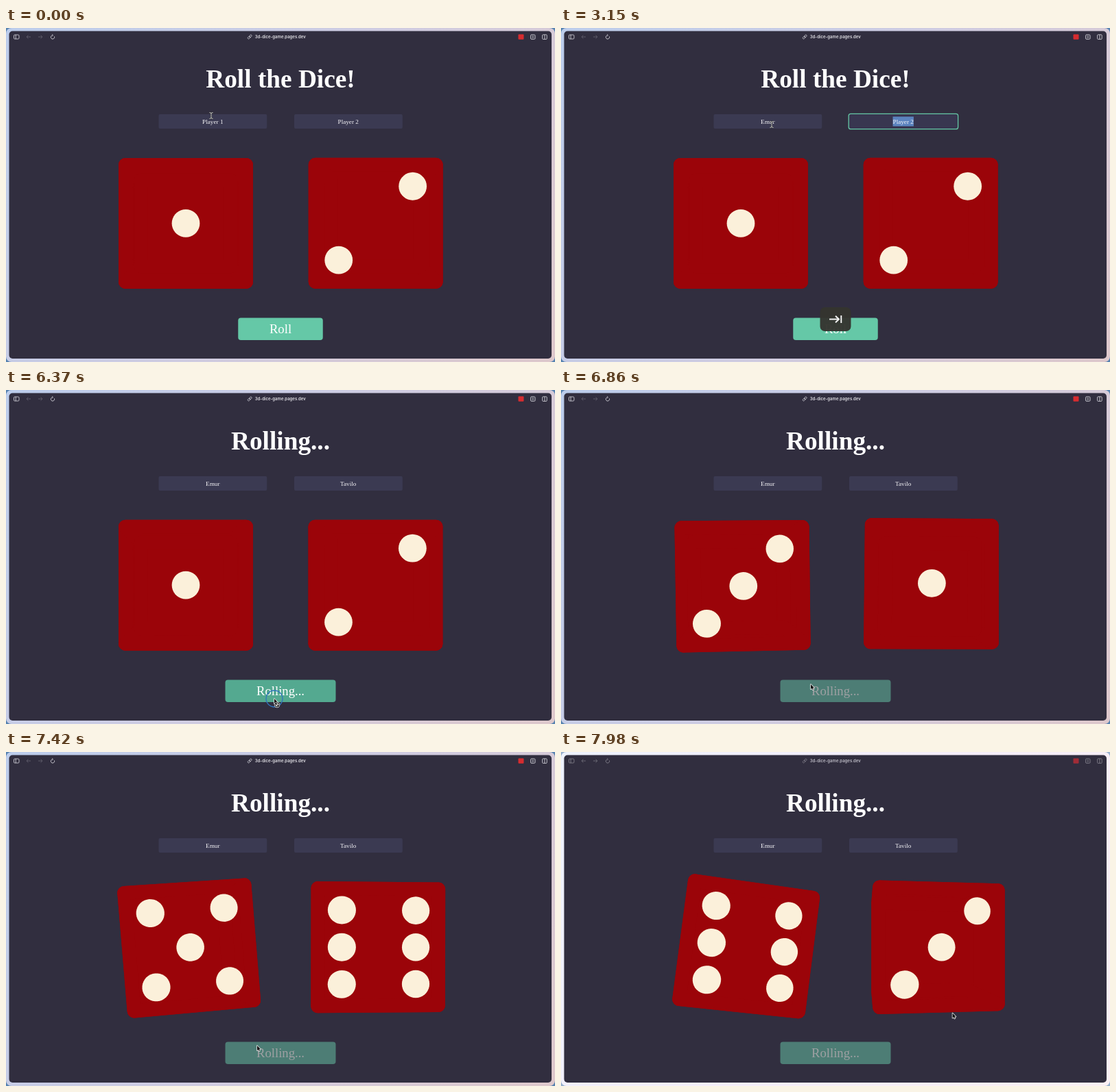
An HTML page with a canvas for the animation above (8 s loop, 800 px wide and 488 px high).

```html
<!DOCTYPE html>
<html lang="en">
<head>
<meta charset="utf-8">
<title>Roll the Dice</title>
<style>
html, body { margin: 0; width: 100%; height: 100%; overflow: hidden; background: #312e3f; }
canvas { display: block; width: 800px; height: 488px; }
</style>
</head>
<body>
<canvas id="stage"></canvas>
<script>
const W = 800, H = 488, LOOP = 8000;
const SERIF = '"Liberation Serif", "Times New Roman", serif';
const SANS = 'Inter, sans-serif';
const RED = '#9b0409', IVORY = '#fbf0da', MINT = '#65c8a7';
const canvas = document.getElementById('stage');
const ctx = canvas.getContext('2d');
const dpr = window.devicePixelRatio || 1;
canvas.width = W * dpr;
canvas.height = H * dpr;

// ---------- helpers ----------
const clamp = x => Math.max(0, Math.min(1, x));
const span = (t, a, b) => clamp((t - a) / (b - a));
const mix = (a, b, p) => a + (b - a) * p;
const ease = p => p * p * (3 - 2 * p);
const rgbMix = (a, b, p) => `rgb(${a.map((v, i) => Math.round(mix(v, b[i], p)))})`;

function box(x, y, w, h, r, fill, stroke, lw = 1) {
  ctx.beginPath();
  ctx.roundRect(x, y, w, h, r);
  if (fill) { ctx.fillStyle = fill; ctx.fill(); }
  if (stroke) { ctx.strokeStyle = stroke; ctx.lineWidth = lw; ctx.stroke(); }
}
function label(str, x, y, font, color, align = 'center') {
  ctx.font = font;
  ctx.textAlign = align;
  ctx.fillStyle = color;
  ctx.fillText(str, x, y);
}
function poly(points, closed) {
  ctx.beginPath();
  points.forEach(([x, y], i) => i ? ctx.lineTo(x, y) : ctx.moveTo(x, y));
  if (closed) ctx.closePath();
}
function line(points, color, lw) {
  poly(points);
  ctx.strokeStyle = color;
  ctx.lineWidth = lw;
  ctx.stroke();
}

// ---------- quaternions [w, x, y, z], y points down, z to the viewer ----------
const axisTurn = (axis, deg) => {
  const a = deg * Math.PI / 360, q = [Math.cos(a), 0, 0, 0];
  q[axis] = Math.sin(a);
  return q;
};
const mul = ([a, b, c, d], [e, f, g, h]) => [
  a * e - b * f - c * g - d * h, a * f + b * e + c * h - d * g,
  a * g - b * h + c * e + d * f, a * h + b * g - c * f + d * e];
const inverse = ([w, x, y, z]) => [w, -x, -y, -z];
const turn = (q, v) => mul(mul(q, [0, ...v]), inverse(q)).slice(1);

function slerp(a, b, p) {
  let dot = a.reduce((s, v, i) => s + v * b[i], 0);
  const sign = dot < 0 ? -1 : 1;
  const th = Math.acos(Math.min(1, dot * sign));
  if (th < 1e-4) return b;
  const k = Math.sin(th);
  return a.map((v, i) => (v * Math.sin((1 - p) * th) + sign * b[i] * Math.sin(p * th)) / k);
}

// ---------- dice ----------
const EYE = 500, CORE = 74.8, FACE = 83, GAP = 45, PIP = 17;
const toFront = {
  1: [1, 0, 0, 0], 6: axisTurn(2, 180), 2: axisTurn(2, 90),
  5: axisTurn(2, -90), 3: axisTurn(1, 90), 4: axisTurn(1, -90)
};
const DIAG = [[1, -1], [-1, 1]], ANTI = [[-1, -1], [1, 1]], MID = [[0, 0]], SIDES = [[-1, 0], [1, 0]];
const pips = {
  1: MID, 2: DIAG, 3: [...DIAG, ...MID], 4: [...DIAG, ...ANTI],
  5: [...DIAG, ...ANTI, ...MID], 6: [...DIAG, ...ANTI, ...SIDES]
};
const pose = (face, yaw = 0, pitch = 0, roll = 0) =>
  mul(mul(mul(axisTurn(2, yaw), axisTurn(1, -pitch)), axisTurn(3, roll)), toFront[face]);

const TIMES = [6370, 6860, 7420, 7980];
const leftRoll = [pose(1), pose(3, 2.3, 0.5, -0.7), pose(5, 4, 0, -4.6), pose(6, 6.4, 0, 7.2)];
const rightRoll = [pose(2), pose(1, 1.3, -1.7, 0.3), pose(6, 3, 0, 0.3), pose(3, 9.3, 0, 0)];

function spin(keys, t) {
  if (t <= TIMES[0]) return keys[0];
  let i = 0;
  while (i < 2 && t > TIMES[i + 1]) i++;
  return slerp(keys[i], keys[i + 1], span(t, TIMES[i], TIMES[i + 1]));
}

function die(cx, cy, q) {
  const project = (v, sy = 1) => {
    const [x, y, z] = turn(q, v), s = EYE / (EYE - z);
    return [cx + x * s, cy + y * s * sy];
  };
  ctx.fillStyle = ctx.strokeStyle = RED;
  ctx.lineJoin = 'round';
  ctx.lineWidth = 20;
  for (const f in toFront) {
    const back = inverse(toFront[f]);
    const corners = [[-1, -1], [1, -1], [1, 1], [-1, 1]];
    poly(corners.map(([u, v]) => project(turn(back, [u * CORE, v * CORE, CORE]), 0.972)), true);
    ctx.fill();
    ctx.stroke();
  }
  ctx.fillStyle = IVORY;
  for (const f in toFront) {
    const back = inverse(toFront[f]);
    const normal = turn(q, turn(back, [0, 0, 1]));
    if (normal[2] * EYE <= FACE) continue;
    for (const [u, v] of pips[f]) {
      const ring = Array.from({ length: 36 }, (_, i) => {
        const a = i * Math.PI / 18;
        return project(turn(back, [u * GAP + PIP * Math.cos(a), v * GAP + PIP * Math.sin(a), FACE]));
      });
      poly(ring, true);
      ctx.fill();
    }
  }
}

// ---------- window ----------
function frame(t) {
  const pale = span(t, 7840, 7980);
  ctx.fillStyle = rgbMix([86, 130, 176], [150, 175, 205], pale);
  ctx.fillRect(0, 0, W, H);
  const g = ctx.createLinearGradient(0, 0, W, H);
  g.addColorStop(0, rgbMix([188, 205, 236], [238, 242, 254], pale));
  g.addColorStop(0.5, rgbMix([207, 204, 226], [245, 238, 250], pale));
  g.addColorStop(1, rgbMix([222, 200, 204], [250, 240, 244], pale));
  box(0, 0, W, H, 8, g);
  box(4.5, 4.5, 790.5, 478.5, 5, '#312e3f');

  const icon = rgbMix([205, 204, 212], [128, 126, 138], pale);
  const dim = rgbMix([96, 94, 108], [110, 108, 120], pale);
  box(11.5, 10, 7.5, 6, 1.2, null, icon, 0.9);
  line([[14.2, 10], [14.2, 16]], icon, 0.9);
  for (const [x, d] of [[33, -1], [50, 1]]) {
    line([[x - 3 * d, 13], [x + 3 * d, 13]], dim, 0.9);
    line([[x + 0.6 * d, 10.6], [x + 3 * d, 13], [x + 0.6 * d, 15.4]], dim, 0.9);
  }
  ctx.beginPath();
  ctx.arc(68, 13.4, 2.7, -0.4, 4.4);
  ctx.strokeStyle = icon;
  ctx.lineWidth = 0.9;
  ctx.stroke();
  line([[67, 9.2], [68.6, 10.6], [67, 12]], icon, 0.9);

  ctx.save();
  ctx.translate(355.2, 13);
  ctx.rotate(-Math.PI / 4);
  box(-3.6, -1.3, 4.2, 2.6, 1.3, null, icon, 0.8);
  box(-0.6, -1.3, 4.2, 2.6, 1.3, null, icon, 0.8);
  ctx.restore();
  label('3d-dice-game.pages.dev', 362.8, 15.2, `600 6px ${SANS}`,
    rgbMix([226, 225, 230], [190, 188, 198], pale), 'left');

  box(746.5, 9.3, 8, 7.4, 1, rgbMix([214, 44, 48], [160, 44, 55], pale));
  box(764.5, 9.8, 6.6, 6.6, 1.5, null, icon, 0.9);
  line([[766, 12], [769.6, 12]], icon, 0.8);
  line([[766, 14.2], [769.6, 14.2]], icon, 0.8);
  box(781.6, 9.8, 6.6, 6.6, 1, null, icon, 0.9);
  line([[784.9, 9.8], [784.9, 16.4]], icon, 0.9);
}

// ---------- inputs ----------
const CLICK1 = 1050, TAB = 3080, CLICK2 = 6340;
const fields = [
  { cx: 301.3, x: 222.5, hint: 'Player 1', name: 'Emur', keys: [2170, 2310, 2450, 2590], from: CLICK1, to: TAB, select: 2100 },
  { cx: 498.7, x: 420, hint: 'Player 2', name: 'Tavilo', keys: [3780, 3990, 4130, 4270, 4480, 4620], from: TAB, to: CLICK2, select: TAB }
];

function field(f, t) {
  const typed = f.keys.filter(k => t >= k).length;
  const text = typed ? f.name.slice(0, typed) : f.hint;
  const focus = t >= f.from && t < f.to;
  const selected = focus && !typed && t >= f.select;
  box(f.x, 126, 157.8, 21, 2, focus ? '#383650' : '#3b3a52');
  if (focus) box(f.x - 0.8, 125.3, 159.4, 22.4, 3, null, MINT, 1.3);
  ctx.font = `9.2px ${SERIF}`;
  const w = ctx.measureText(text).width;
  if (selected) {
    ctx.fillStyle = '#5b83bf';
    ctx.fillRect(f.cx - w / 2, 129.5, w, 14);
  }
  label(text, f.cx, 139.6, ctx.font, '#f6f5f8');
  const last = typed ? f.keys[typed - 1] : f.from;
  if (focus && !selected && (t - last) % 1060 < 530) {
    ctx.fillStyle = '#fff';
    ctx.fillRect(f.cx + w / 2 + 0.2, 131, 0.8, 11);
  }
}

function button(t) {
  const rolling = t >= CLICK2;
  const hover = span(t, 5320, 5520), off = ease(span(t, 6370, 6700));
  const w = rolling ? 161 : 123.5;
  const tint = off ? rgbMix([84, 169, 144], [77, 125, 117], off)
                   : rgbMix([101, 200, 167], [84, 169, 144], hover);
  box(400 - w / 2, 423.5, w, 32.5, 4, tint);
  label(rolling ? 'Rolling...' : 'Roll', 400, 446, `18.7px ${SERIF}`,
    rgbMix([255, 255, 255], [158, 160, 163], off));
}

function keyCap(t) {
  if (t < 2100 || t >= 5040) return;
  ctx.save();
  ctx.globalAlpha = 0.96 * (1 - span(t, 4800, 5040));
  if (t < TAB) {
    box(371, 408, 58, 35, 7, '#35352f');
    label('⌘A', 400, 433, `500 20px Inter, "DejaVu Sans", sans-serif`, '#fff');
  } else {
    box(377.5, 408, 45, 35, 7, '#35352f');
    line([[391, 425.5], [404.5, 425.5]], '#fff', 1.9);
    line([[400, 420.8], [405, 425.5], [400, 430.2]], '#fff', 1.9);
    line([[408.3, 420], [408.3, 431]], '#fff', 1.9);
  }
  ctx.restore();
}

// ---------- pointer ----------
const path = [
  [0, 299, 128], [210, 299, 128], [490, 305, 132], [630, 305, 132], [770, 307, 134],
  [2800, 307, 134], [2870, 307, 141], [4760, 307, 141], [5390, 383, 436], [5530, 383, 436],
  [6200, 391, 451], [6440, 391, 451], [6790, 364, 430], [7280, 364, 430],
  [7420, 366, 429], [7980, 570.5, 381.5], [8000, 570.5, 381.5]
];
function pointerAt(t) {
  let i = 0;
  while (i < path.length - 2 && t >= path[i + 1][0]) i++;
  const [a, x, y] = path[i], [b, u, v] = path[i + 1], p = ease(span(t, a, b));
  return [mix(x, u, p), mix(y, v, p)];
}
function ring(x, y, t, start, life) {
  if (t < start || t >= start + life) return;
  ctx.globalAlpha = 1 - span(t, start + life * 0.4, start + life);
  ctx.beginPath();
  ctx.arc(x, y, 12, 0, 7);
  ctx.strokeStyle = '#2f74bd';
  ctx.lineWidth = 1.3;
  ctx.stroke();
  ctx.globalAlpha = 1;
}
function pointer(t) {
  const [x, y] = pointerAt(t);
  ring(x, y, t, CLICK1, 350);
  ring(x, y, t, 6270, 290);
  const inField = y > 120 && y < 148;
  ctx.lineJoin = 'round';
  if (inField) {
    const bar = [[x, y - 3.6], [x, y + 3.6]];
    const cap = s => [[x - 2.6, y + 4.3 * s], [x - 1, y + 4.2 * s], [x, y + 3.4 * s], [x + 1, y + 4.2 * s], [x + 2.6, y + 4.3 * s]];
    for (const [c, w] of [['#222', 1.9], ['#e8e8ea', 0.9]])
      for (const part of [bar, cap(-1), cap(1)]) line(part, c, w);
    return;
  }
  poly([[x, y], [x, y + 7.2], [x + 1.7, y + 5.7], [x + 2.8, y + 8.1], [x + 3.9, y + 7.6], [x + 2.9, y + 5.3], [x + 5, y + 5.2]], true);
  ctx.strokeStyle = '#f2f2f2';
  ctx.lineWidth = 1.5;
  ctx.stroke();
  ctx.fillStyle = '#111';
  ctx.fill();
  if (t >= CLICK2 && t < 6600) {
    ctx.beginPath();
    ctx.arc(x + 4, y + 9, 4.2, 0, 7);
    ctx.fillStyle = '#f4f4f4';
    ctx.fill();
    ctx.beginPath();
    ctx.arc(x + 4, y + 9, 2.9, 0, 7);
    ctx.strokeStyle = '#222';
    ctx.lineWidth = 1.1;
    ctx.stroke();
    line([[x + 2, y + 7], [x + 6, y + 11]], '#222', 1.1);
  }
}

function draw(t) {
  ctx.setTransform(dpr, 0, 0, dpr, 0, 0);
  frame(t);
  label(t >= CLICK2 ? 'Rolling...' : 'Roll the Dice!', 400, 87.3, `bold 37.3px ${SERIF}`, '#fff');
  fields.forEach(f => field(f, t));
  die(262, 285.4, spin(leftRoll, t));
  die(538.7, 285.2, spin(rightRoll, t));
  button(t);
  keyCap(t);
  pointer(t);
}

const start = performance.now();
function tick() {
  draw((performance.now() - start) % LOOP);
  requestAnimationFrame(tick);
}
tick();
</script>
</body>
</html>
```
